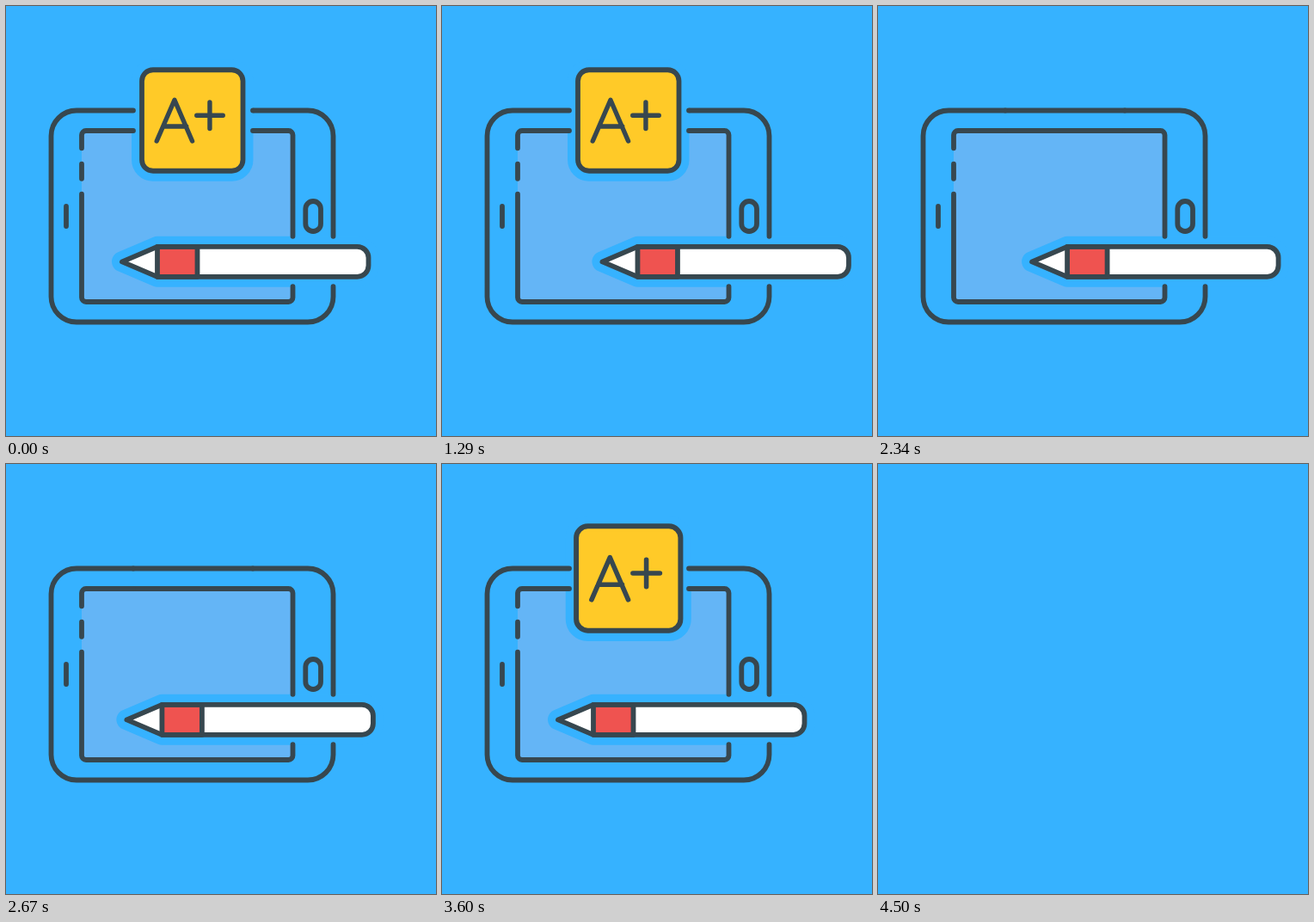
These frames come from a looping animation (500 px wide and 500 px high, 4530 ms). An HTML page with a canvas:

```html
<!DOCTYPE html>
<html lang="en">
<head>
<meta charset="utf-8">
<title>Tablet and pencil</title>
<style>
  html, body { margin: 0; width: 100%; height: 100%; overflow: hidden; background: #36b2ff; }
  canvas { display: block; width: 500px; height: 500px; }
</style>
</head>
<body>
<canvas id="stage"></canvas>
<script>
const SIZE = 500, LOOP = 4530, BLANK = 4500;
const BG = '#36b2ff', INK = '#37474f', SCREEN = '#64b5f6',
      YELLOW = '#ffca28', RED = '#ef5350', WHITE = '#ffffff';
const CARD = { x: 216.75, y: 133, half: 58.75 };
const LINE = 5.8, HALO = 24, REACH = 67.5;

const canvas = document.getElementById('stage');
const ctx = canvas.getContext('2d');
const dpr = window.devicePixelRatio || 1;
canvas.width = canvas.height = SIZE * dpr;

const progress = (t, start, length) => Math.min(1, Math.max(0, (t - start) / length));
const sineInOut = u => (1 - Math.cos(Math.PI * u)) / 2;
const backIn = u => u * u * (1.95 * u - 0.95);

// Pencil slides right with a quartic ease-in, then back with a quartic ease-out.
function penShift(t) {
  if (t < 2250) return REACH * progress(t, 450, 900) ** 4;
  return REACH * (1 - progress(t, 2250, 900)) ** 4;
}

// Card shrinks away, then pops in and settles with a damped swing.
function cardScale(t) {
  if (t < 3150) return 1 - backIn(progress(t, 1500, 450));
  if (t < 3500) return 1.1 * sineInOut(progress(t, 3150, 350));
  const u = progress(t, 3500, 400);
  return 1 + 0.1 * Math.cos(u * 3.77) * (1 - u) ** 2;
}

function paint(path, { fill, stroke, width = LINE }) {
  if (fill) {
    ctx.fillStyle = fill;
    ctx.fill(path);
  }
  if (stroke) {
    ctx.strokeStyle = stroke;
    ctx.lineWidth = width;
    ctx.stroke(path);
  }
}

function box(x, y, w, h, r) {
  const p = new Path2D();
  p.moveTo(x + r, y);
  p.arcTo(x + w, y, x + w, y + h, r);
  p.arcTo(x + w, y + h, x, y + h, r);
  p.arcTo(x, y + h, x, y, r);
  p.arcTo(x, y, x + w, y, r);
  p.closePath();
  return p;
}

const screen = box(88, 145, 245.5, 199, 5);
const bridges = new Path2D('M148 121.5H287M148 145H287');
const tablet = new Path2D(
  'M148 121.5H82A29.5 29.5 0 0 0 52.5 151V338A29.5 29.5 0 0 0 82 367.5H351A29.5 29.5 0 0 0 380.5 338V326.2' +
  'M287 121.5H351A29.5 29.5 0 0 1 380.5 151V267.8' +
  'M148 145H93A5 5 0 0 0 88 150V165.3M88 183.7V200.8M88 218.7V339A5 5 0 0 0 93 344H328.5A5 5 0 0 0 333.5 339V326.2' +
  'M287 145H328.5A5 5 0 0 1 333.5 150V267.8M70 233V256');
const button = box(348.3, 227, 17.7, 35, 8.8);

const pencil = new Path2D('M135 297.3L176 279.8H408.5A13 13 0 0 1 421.5 292.8V301.8A13 13 0 0 1 408.5 314.8H176Z');
const band = new Path2D('M176 279.8H222.5V314.8H176Z');

const { half } = CARD;
const card = box(-half, -half, 2 * half, 2 * half, 13);
const grade = new Path2D('M-41.5 24L-20.8 -23.7L-0.2 24M-34 7H-7M5 -5.8H35.5M20.2 -21V9.5');

function onPencil(shift, draw) {
  ctx.save();
  ctx.translate(shift, 0);
  draw();
  ctx.restore();
}

function onCard(scale, draw) {
  if (scale < 0.002) return;
  ctx.save();
  ctx.translate(CARD.x, CARD.y);
  ctx.scale(scale, scale);
  draw();
  ctx.restore();
}

function render(t) {
  ctx.setTransform(dpr, 0, 0, dpr, 0, 0);
  ctx.fillStyle = BG;
  ctx.fillRect(0, 0, SIZE, SIZE);
  if (t >= BLANK) return;

  const shift = penShift(t), scale = cardScale(t);
  const halo = { fill: BG, stroke: BG, width: HALO };
  ctx.lineCap = ctx.lineJoin = 'round';

  paint(screen, { fill: SCREEN });
  paint(bridges, { stroke: INK });
  onCard(scale, () => paint(card, halo));
  onPencil(shift, () => paint(pencil, halo));

  paint(tablet, { stroke: INK });
  paint(button, { stroke: INK });

  onPencil(shift, () => {
    paint(pencil, { fill: WHITE });
    paint(band, { fill: RED, stroke: INK });
    paint(pencil, { stroke: INK });
  });
  onCard(scale, () => {
    paint(card, { fill: YELLOW, stroke: INK });
    paint(grade, { stroke: INK, width: 5.4 });
  });
}

const begin = performance.now();
function tick() {
  render((performance.now() - begin) % LOOP);
  requestAnimationFrame(tick);
}
tick();
</script>
</body>
</html>
```
